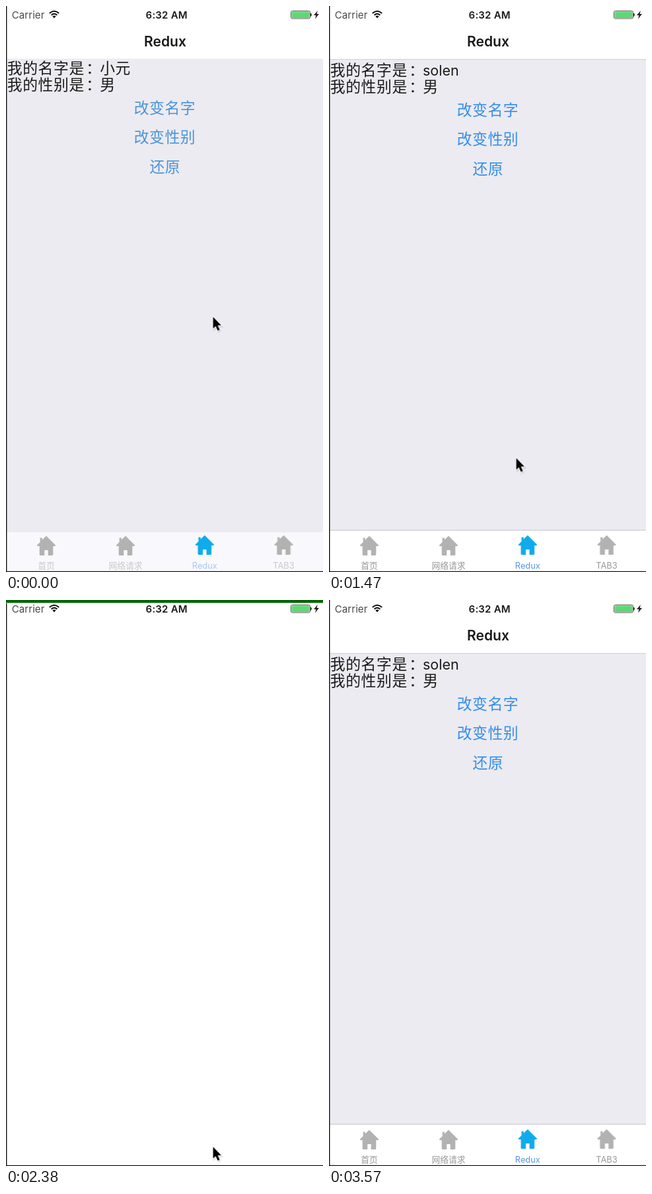
Animation, 480 px wide and 854 px high, one loop 3.71 s. Source, as an HTML page:

```html
<!DOCTYPE html>
<html lang="zh-CN">
<head>
<meta charset="utf-8">
<title>Redux</title>
<style>
html, body { margin: 0; width: 100%; height: 100%; overflow: hidden; background: #fff; }
svg { display: block; width: 100%; height: 100%; }
text { font-family: Inter, "Noto Sans CJK SC", sans-serif; white-space: pre; }
.mid { text-anchor: middle; }
.title { font-size: 21px; font-weight: 600; fill: #181818; }
.body { font-size: 22.8px; letter-spacing: .6px; fill: #1a1a1a; }
.name { font-size: 21.5px; letter-spacing: 0; }
.link { font-size: 22.8px; letter-spacing: .5px; fill: #338dec; text-anchor: middle; }
.label { font-size: 12.8px; text-anchor: middle; }
.off { fill: #b2b2b2; }
.off .label { fill: #999; }
.on { fill: #10abec; }
.on .label { fill: #5594ea; }

/* one loop is 53 ticks of 70 ms */
.app, .redux, .home, .before, .after, .crisp, .label, .list, .link, .press, .bar, .cursor {
  animation: 3710ms step-end infinite;
}
.app { animation-name: app; }
.redux { animation-name: redux; }
.home { animation-name: home; }
.before { animation-name: before; }
.after { animation-name: after; }
.crisp { animation-name: crisp; }
.label { animation-name: label; }
.list { animation-name: list; }
.link { animation-name: tint; }
.press { animation-name: press; }
.bar { animation-name: bar; }
.cursor { animation-name: cursor; }

@keyframes app { 0%, 69.81% { opacity: 1 } 49.056% { opacity: 0 } 100% { opacity: 1 } }
@keyframes redux { 0% { opacity: 1 } 49.056% { opacity: 0 } 83.018%, 100% { opacity: 1 } }
@keyframes home { 0% { opacity: 0 } 69.81% { opacity: 1 } 83.018%, 100% { opacity: 0 } }
@keyframes before { 0% { opacity: 1 } 20.754%, 100% { opacity: 0 } }
@keyframes after { 0% { opacity: 0 } 20.754%, 100% { opacity: 1 } }
@keyframes crisp { 0% { opacity: 0 } 1.886%, 100% { opacity: 1 } }
@keyframes label { 0% { opacity: .5 } 1.886%, 100% { opacity: 1 } }
@keyframes list { 0% { transform: translateY(-3px) } 1.886%, 100% { transform: none } }
@keyframes tint { 0% { fill: #4a93d8 } 1.886%, 100% { fill: #338dec } }
@keyframes press {
  0% { opacity: 1 }
  15.094% { opacity: 1; animation-timing-function: steps(2) }
  18.867% { opacity: .2 }
  20.754% { opacity: .2; animation-timing-function: steps(4) }
  28.301%, 100% { opacity: 1 }
}
@keyframes bar {
  0% { transform: translateY(-30px) }
  49.056% { transform: translateY(0) }
  58.49% { transform: translateY(0); animation-timing-function: steps(3) }
  64.15% { transform: translateY(-24px) }
  66.037%, 100% { transform: translateY(-30px) }
}
@keyframes cursor {
  0% { transform: translate(313px, 468px); animation-timing-function: steps(4) }
  7.547% { transform: translate(274px, 286px); animation-timing-function: steps(3) }
  13.207% { transform: translate(249px, 166px); animation-timing-function: steps(2) }
  16.981% { transform: translate(247.5px, 158px) }
  24.528% { transform: translate(247.5px, 158px); animation-timing-function: steps(8) }
  39.622% { transform: translate(283px, 681px) }
  49.056% { transform: translate(283px, 681px); animation-timing-function: steps(2) }
  52.83% { transform: translate(289px, 723px); animation-timing-function: steps(6) }
  64.15% { transform: translate(313px, 824px); animation-timing-function: steps(4) }
  71.697% { transform: translate(302px, 816px) }
  83.018% { transform: translate(302px, 816px); animation-timing-function: steps(4) }
  90.565%, 100% { transform: translate(302px, 862px) }
}
</style>
</head>
<body>
<svg viewBox="0 0 480 854" preserveAspectRatio="none">
  <defs>
    <path id="house" d="M0 799.5 L5.5 804.9 14 813.6 Q14.4 815 13 815 H10.3 V827.5 Q10.3 829 9 829 H2.7 V821 H-2.7 V829 H-9 Q-10.3 829 -10.3 827.5 V815 H-13 Q-14.4 815 -14 813.6 L-9.4 809 V802.5 H-6.2 V805.6 Z"/>
  </defs>
  <rect width="480" height="854" fill="#fff"/>

  <g class="app">
    <rect y="79.5" width="480" height="714.5" fill="#ecebf1"/>
    <rect y="794" width="480" height="60" fill="#f9f8fc"/>
    <g class="crisp">
      <rect y="79" width="480" height="1.5" fill="#fff"/>
      <rect y="80" width="480" height="1" fill="#d0d0d4"/>
      <rect y="791" width="480" height="63" fill="#fff"/>
      <rect y="790.5" width="480" height="1" fill="#c4c4c8"/>
    </g>
    <g class="off" transform="translate(181 0)"><use href="#house"/><text class="label" y="848.5">网络请求</text></g>
    <g class="off" transform="translate(420.5 0)"><use href="#house" y="-1"/><text class="label" y="848.5">TAB3</text></g>
  </g>

  <g class="redux">
    <text class="title mid" x="241" y="61">Redux</text>
    <g class="list">
      <text class="body" x="1.8" y="104.7">我的名字是<tspan dx="2.5">：</tspan></text>
      <text class="body before" x="142.2" y="104.7">小元</text>
      <text class="body name after" x="142" y="104.5">solen</text>
      <text class="body" x="1.8" y="129.7">我的性别是<tspan dx="2.5">：</tspan></text>
      <text class="body" x="142.2" y="129.7">男</text>
      <g class="press"><text class="link" x="240.4" y="164.5">改变名字</text></g>
      <text class="link" x="240.4" y="209">改变性别</text>
      <text class="link" x="240.8" y="253.8">还原</text>
    </g>
    <g class="off" transform="translate(61 0)"><use href="#house"/><text class="label" y="848.5">首页</text></g>
    <g class="on" transform="translate(300.8 0)"><use href="#house" y="-1"/><text class="label" y="848.5">Redux</text></g>
  </g>

  <g class="home">
    <text class="title mid" x="240.5" y="61.5">首页</text>
    <text x="1" y="126" font-size="44" letter-spacing="-.9" fill="#050505">home</text>
    <text class="mid" x="240.5" y="169" font-size="21.8" fill="#338dec">goSome1</text>
    <g class="on" transform="translate(61 0)"><use href="#house"/><text class="label" y="848.5">首页</text></g>
    <g class="off" transform="translate(300.8 0)"><use href="#house" y="-1"/><text class="label" y="848.5">Redux</text></g>
  </g>

  <g>
    <text x="8.7" y="18.5" font-size="15" letter-spacing=".1" fill="#484848">Carrier</text>
    <g fill="none" stroke="#111" stroke-width="2">
      <path d="M65.8 11 Q73 4.4 80.2 11"/>
      <path d="M68.6 13.8 Q73 9.8 77.4 13.8"/>
    </g>
    <path d="M70.4 15.4 Q73 13.4 75.6 15.4 L73 18.4 Z" fill="#111"/>
    <text class="mid" x="243.2" y="18.5" font-size="15" font-weight="600" letter-spacing=".2" fill="#1a1a1a">6:32 AM</text>
    <rect x="431.5" y="7.5" width="29" height="11.5" rx="2" fill="#fff" stroke="#555"/>
    <rect x="432.5" y="8.5" width="27" height="9.5" rx="1" fill="#60d674"/>
    <path d="M461.5 11 Q463.6 13.2 461.5 15.5 Z" fill="#333" stroke="#333"/>
    <path d="M471.8 7 L466 14 H469.4 L468 19.4 L474 12 H470.6 Z" fill="#222"/>
  </g>

  <rect width="1.4" height="854" fill="#151515"/>
  <rect y="852.8" width="480" height="1.2" fill="#151515"/>

  <g class="bar">
    <rect y="28" width="480" height="1" fill="#9fbf9f"/>
    <rect width="480" height="28" fill="#006400"/>
    <text class="mid" x="241" y="20" font-size="15.1" fill="#f2f7f2">Downloading JavaScript bundle 100% (2539/2539)...</text>
  </g>

  <g class="cursor">
    <g transform="translate(.5 1) scale(.95)">
      <path d="M1 2 V21 L5.4 17.2 L8.6 24 L11.8 22.6 L8.8 16 H14.5 Z" opacity=".1" stroke="#000" stroke-width="2"/>
      <path d="M0 0 V18.6 L4.2 14.8 L7.4 22 L10.6 20.6 L7.4 13.6 H13 Z" stroke="#fff" stroke-width="1.8" stroke-linejoin="round" paint-order="stroke"/>
    </g>
  </g>
</svg>
</body>
</html>
```
